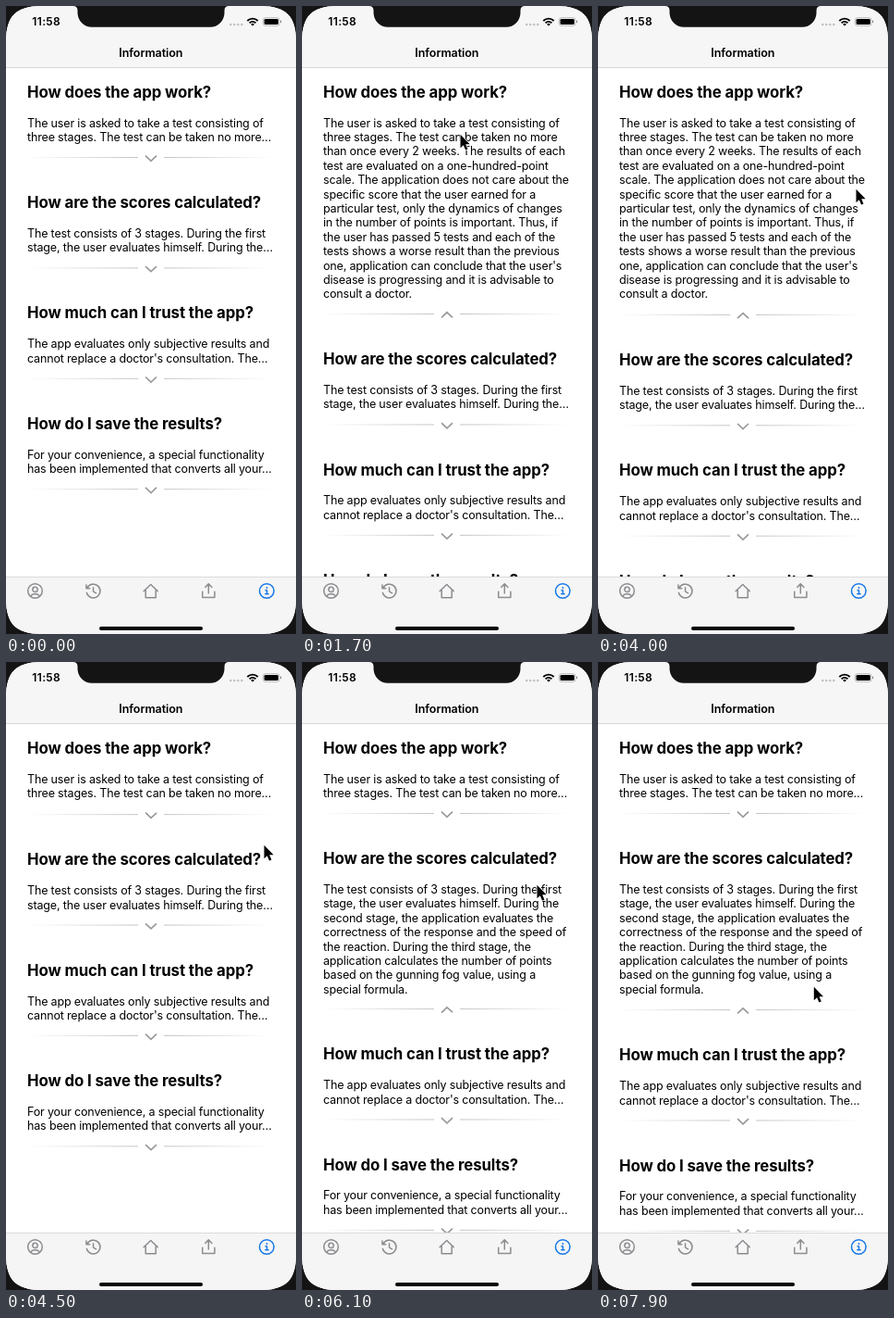
Animation, 314 px wide and 678 px high, one loop 8000 ms. Source, as an HTML page:

```html
<!DOCTYPE html>
<html lang="en">
<head>
<meta charset="utf-8">
<title>Information</title>
<style>
  html, body { margin: 0; width: 100%; height: 100%; overflow: hidden; background: #141414; }
  svg { display: block; width: 314px; height: 678px; font-family: Inter, Roboto, sans-serif; }
  .title { font-size: 16.8px; font-weight: 700; letter-spacing: -.09px; }
  .body { font-size: 12.5px; letter-spacing: -.16px; }
  .head { font-size: 12.5px; font-weight: 600; letter-spacing: -.06px; text-anchor: middle; }
  .time { font-size: 12px; font-weight: 600; letter-spacing: .4px; }
  .icon { fill: none; stroke: #8c8c90; stroke-width: 1.5; stroke-linecap: round; stroke-linejoin: round; }
</style>
</head>
<body>
<svg viewBox="0 0 314 678">
  <defs>
    <linearGradient id="fadeIn"><stop stop-color="#c4c4c4" stop-opacity="0"/><stop offset="1" stop-color="#c4c4c4"/></linearGradient>
    <linearGradient id="fadeOut"><stop stop-color="#c4c4c4"/><stop offset="1" stop-color="#c4c4c4" stop-opacity="0"/></linearGradient>
    <clipPath id="screen">
      <path d="M0 38C0 11 11 0 38 0H276C303 0 314 11 314 38V640C314 667 303 678 276 678H38C11 678 0 667 0 640Z"/>
    </clipPath>
  </defs>
  <rect width="314" height="678" fill="#141414"/>
  <g clip-path="url(#screen)">
    <rect width="314" height="678" fill="#fff"/>
    <g id="list"></g>

    <rect width="314" height="66" fill="#f6f6f6"/>
    <rect y="66" width="314" height="1" fill="#d6d6d6"/>
    <text class="head" x="156.9" y="54.5">Information</text>
    <text class="time" x="28.2" y="21.3">11:58</text>
    <path d="M243.3 20h13" stroke="#c2c2c2" stroke-width="2.6" stroke-linecap="round" stroke-dasharray="0 4"/>
    <g fill="none" stroke="#000" stroke-width="1.8">
      <path d="M261.3 16a8 8 0 0 1 11.4 0M263.6 18.3a4.8 4.8 0 0 1 6.8 0"/>
      <path d="M267 21.6l-1.9-1.9a2.7 2.7 0 0 1 3.8 0z" fill="#000" stroke="none"/>
    </g>
    <rect x="278.4" y="12.7" width="17.6" height="8.6" rx="2.4" fill="none" stroke="#aaa" stroke-width=".8"/>
    <rect x="279.6" y="13.9" width="15.2" height="6.2" rx="1.4"/>
    <path d="M297 15.6q1.3 .4 1.3 1.4t-1.3 1.4z" fill="#888"/>

    <rect y="616" width="314" height="62" fill="#f5f5f5"/>
    <rect y="616" width="314" height="1" fill="#dadada"/>
    <g class="icon">
      <g transform="translate(31.5 631.5)">
        <circle r="7.8"/><circle cy="-1.6" r="2.7"/><path d="M-4.8 5.8q1.2-2.6 4.8-2.6t4.8 2.6"/>
      </g>
      <g transform="translate(94.5 631.5)">
        <path d="M-6.6-3.2A7.4 7.4 0 1 1-7.1 2M-7.6-6.6v3.9h3.9M0-3.8V.6l3 1.7"/>
      </g>
      <g transform="translate(156.7 631.5)">
        <path d="M-7.6 .2 0-7 7.6 .2M-5.5-1.4V7.2H5.5V-1.4"/>
      </g>
      <g transform="translate(219.3 631.5)">
        <path d="M0 2.6V-7.4M-3.6-4 0-7.6 3.6-4M-6.6 .8V7H6.6V.8"/>
      </g>
      <g transform="translate(282.3 631.5)" stroke="#1479e6">
        <circle r="7.8"/><path d="M-1.2-.7H.2V3.3M-1.5 3.3H1.8"/><circle cy="-3.4" r=".5" fill="#1479e6" stroke-width="1"/>
      </g>
    </g>
    <rect x="101" y="670" width="112" height="4" rx="2"/>
  </g>
  <path d="M72.5 0q5 0 5 5v2.3a15.5 15.5 0 0 0 15.5 15.5H221a15.5 15.5 0 0 0 15.5-15.5V5q0-5 5-5z" fill="#141414"/>
  <path id="cursor" d="M0 .7V15.3L3.3 12.2 5.6 17.5 8 16.5 5.7 11.3H10.2Z" stroke="#fff" stroke-width="1.6" paint-order="stroke" stroke-linejoin="round"/>
</svg>
<script>
const LOOP = 8000, STEP = 100, PITCH = 119.4, LINE = 15.4, SLIDE = 337;

const items = [
  { title: "How does the app work?",
    lines: ["The user is asked to take a test consisting of", "three stages. The test can be taken no more",
      "than once every 2 weeks. The results of each", "test are evaluated on a one-hundred-point",
      "scale. The application does not care about the", "specific score that the user earned for a",
      "particular test, only the dynamics of changes", "in the number of points is important. Thus, if",
      "the user has passed 5 tests and each of the", "tests shows a worse result than the previous",
      "one, application can conclude that the user's", "disease is progressing and it is advisable to",
      "consult a doctor."],
    extra: 169.9, open: 1380, close: 4183 },
  { title: "How are the scores calculated?",
    lines: ["The test consists of 3 stages. During the first", "stage, the user evaluates himself. During the",
      "second stage, the application evaluates the", "correctness of the response and the speed of",
      "the reaction. During the third stage, the", "application calculates the number of points",
      "based on the gunning fog value, using a", "special formula."],
    extra: 92.7, open: 5788, close: Infinity },
  { title: "How much can I trust the app?",
    lines: ["The app evaluates only subjective results and", "cannot replace a doctor's consultation. The"] },
  { title: "How do I save the results?",
    lines: ["For your convenience, a special functionality", "has been implemented that converts all your"] }
];

// time, x, y of the pointer tip
const path = [
  [400, 278, 326], [600, 229.5, 184.5], [800, 229.5, 184.5], [1100, 171.5, 138], [1750, 171.5, 138],
  [2200, 196, 179], [2500, 212, 192.5], [3200, 212, 192.5], [4000, 279.5, 197], [4800, 279.5, 197],
  [5400, 254.5, 240], [6200, 254.5, 240], [6700, 244, 300], [7400, 233.8, 350], [LOOP, 233.8, 350]
];

const NS = "http://www.w3.org/2000/svg";
function add(parent, tag, attrs, text) {
  const el = document.createElementNS(NS, tag);
  for (const k in attrs) el.setAttribute(k, attrs[k]);
  if (text) el.textContent = text;
  return parent.appendChild(el);
}

const list = document.getElementById("list");
const cursor = document.getElementById("cursor");

items.forEach((it, i) => {
  it.group = add(list, "g", {});
  add(it.group, "text", { class: "title", x: 23, y: 98.7 }, it.title);
  const clip = add(it.group, "clipPath", { id: "clip" + i });
  it.clip = add(clip, "rect", { y: 117, width: 314, height: 33 });
  const body = add(it.group, "g", { class: "body", "clip-path": `url(#clip${i})` });
  it.rows = it.lines.map((s, n) => add(body, "text", { x: 23, y: 130.6 + n * LINE }, s));
  it.foot = add(it.group, "g", {});
  add(it.foot, "rect", { x: 23, y: 163, width: 120, height: 1, fill: "url(#fadeIn)" });
  add(it.foot, "rect", { x: 171, y: 163, width: 118, height: 1, fill: "url(#fadeOut)" });
  it.arrow = add(it.foot, "path", { d: "M-6-2.8 0 2.8 6-2.8", fill: "none", stroke: "#9a9a9a", "stroke-width": 1.7 });
});

const clamp = v => Math.min(1, Math.max(0, v));

// cubic-bezier(.42, 0, .58, 1)
function easeInOut(x) {
  let lo = 0, hi = 1, s = x;
  for (let i = 0; i < 20; i++) {
    s = (lo + hi) / 2;
    const bx = 3 * s * (1 - s) * (.42 * (1 - s) + .58 * s) + s ** 3;
    if (bx < x) lo = s; else hi = s;
  }
  return s * s * (3 - 2 * s);
}
const slide = (t, start) => easeInOut(clamp((t - start) / SLIDE));

function moveCursor(t) {
  const i = path.findIndex(p => p[0] > t);
  cursor.style.display = i > 0 ? "" : "none";
  if (i < 1) return;
  const [t0, x0, y0] = path[i - 1], [t1, x1, y1] = path[i];
  const k = (t - t0) / (t1 - t0), e = k * k * (3 - 2 * k);
  cursor.setAttribute("transform", `translate(${x0 + (x1 - x0) * e} ${y0 + (y1 - y0) * e})`);
}

function draw(t) {
  let shift = 0;
  items.forEach((it, i) => {
    const p = it.extra ? slide(t, it.open) - slide(t, it.close) : 0;
    const full = it.extra && t >= it.open && t < it.close;
    const grow = p * (it.extra || 0);
    it.group.setAttribute("transform", `translate(0 ${i * PITCH + shift})`);
    it.clip.setAttribute("height", 33 + grow);
    it.rows.forEach((row, n) => {
      if (n > 1) row.style.display = full ? "" : "none";
    });
    it.rows[1].textContent = it.lines[1] + (full ? "" : "…");
    it.foot.setAttribute("transform", `translate(0 ${grow})`);
    it.arrow.setAttribute("transform", `translate(157 164.5) rotate(${180 * p})`);
    shift += grow;
  });
  moveCursor(t);
}

const start = performance.now();
function tick() {
  const t = (performance.now() - start) % LOOP;
  draw(Math.floor(t / STEP) * STEP);
  requestAnimationFrame(tick);
}
tick();
</script>
</body>
</html>
```
